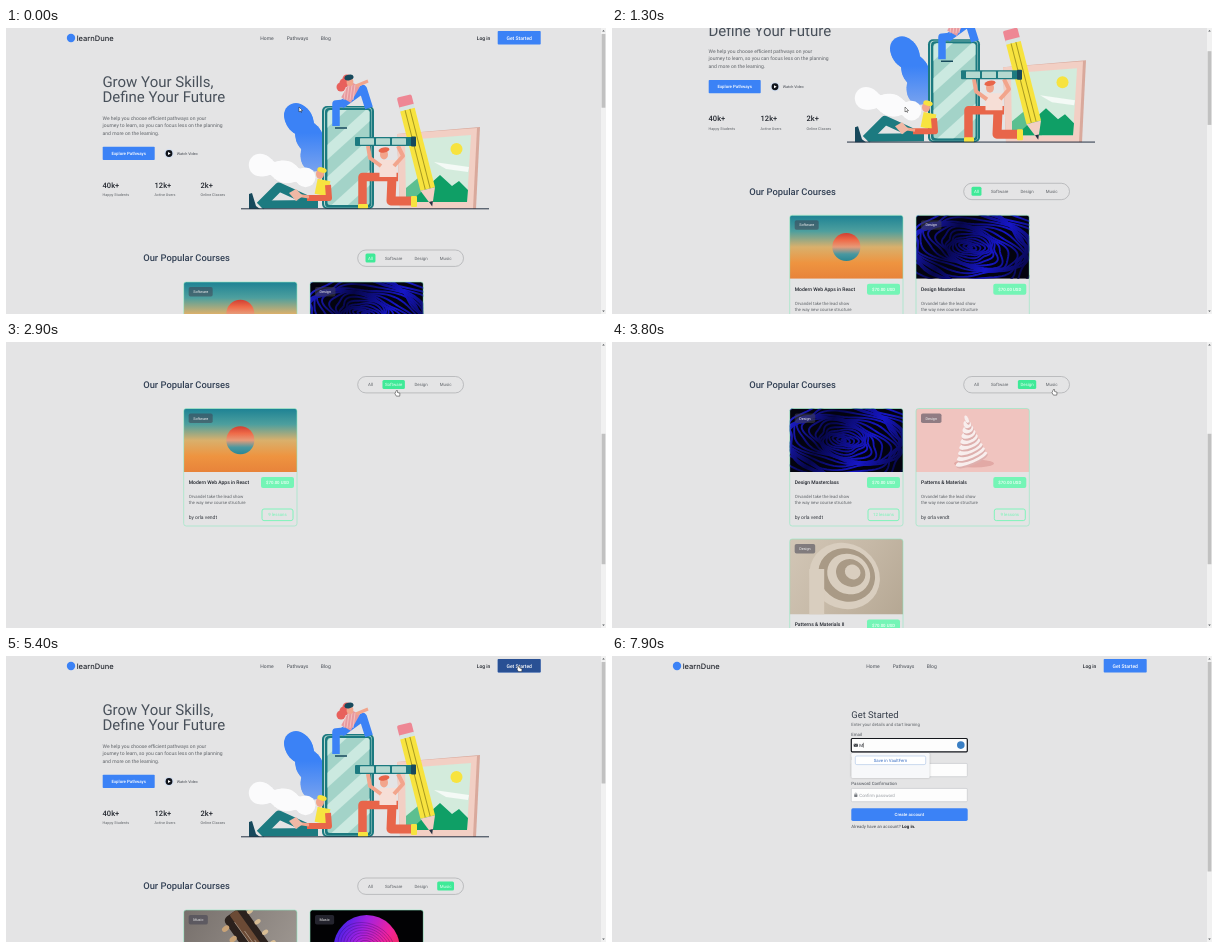
Animation, 600 px wide and 286 px high, one loop 8 s. Source, as an HTML page with a canvas:

```html
<!DOCTYPE html>
<html lang="en">
<head>
<meta charset="utf-8">
<title>Course site</title>
<style>
html, body { margin: 0; width: 100%; height: 100%; overflow: hidden; background: #e4e4e4; }
canvas { display: block; width: 600px; height: 286px; }
</style>
</head>
<body>
<canvas id="stage"></canvas>
<script>
const W = 600, H = 286, LOOP = 8000;
const BG = '#e4e4e5', BLUE = '#3b82f6', MINT = '#74f5b6', INK = '#263244', GREY = '#5f6368';
const TEAL = '#1c7a80', DEEP = '#17495c', RED = '#e8654a', SKIN = '#f2a58c', PINK = '#f2cfc4', YELLOW = '#f7e33f';
const REM = 5, SMALL = REM * 0.875, TINY = REM * 0.75;
const canvas = document.getElementById('stage');
const c = canvas.getContext('2d');
const dpr = window.devicePixelRatio || 1;
canvas.width = W * dpr;
canvas.height = H * dpr;

const ramp = (t, a, b) => Math.min(1, Math.max(0, (t - a) / (b - a)));
const ease = u => u * u * (3 - 2 * u);

function text(s, x, y, size, color, weight = 400, align = 'left', font = 'Roboto') {
  c.font = `${weight} ${size}px ${font}, sans-serif`;
  c.textAlign = align;
  c.fillStyle = color;
  c.fillText(s, x, y + size * 0.36);
}
function widthOf(s, size) {
  c.font = `400 ${size}px Roboto, sans-serif`;
  return c.measureText(s).width;
}
function paint(fill, stroke, lw = 0.6) {
  if (fill) { c.fillStyle = fill; c.fill(); }
  if (stroke) { c.strokeStyle = stroke; c.lineWidth = lw; c.stroke(); }
}
function box(x, y, w, h, r, fill, stroke, lw) {
  c.beginPath();
  c.roundRect(x, y, w, h, r);
  paint(fill, stroke, lw);
}
function disc(x, y, r, fill, ry = r, rot = 0) {
  c.beginPath();
  c.ellipse(x, y, r, ry, rot, 0, 7);
  paint(fill);
}
function line(p) {
  c.beginPath();
  for (let i = 0; i < p.length; i += 2) c.lineTo(p[i], p[i + 1]);
}
function poly(fill, ...p) {
  line(p);
  c.closePath();
  paint(fill);
}
function limb(color, lw, ...p) {
  line(p);
  c.lineJoin = 'round';
  paint(null, color, lw);
}
function grad(x0, y0, x1, y1, ...colors) {
  const g = c.createLinearGradient(x0, y0, x1, y1);
  colors.forEach((k, i) => g.addColorStop(i / (colors.length - 1), k));
  return g;
}
function fillAll(w, h, fill) {
  c.fillStyle = fill;
  c.fillRect(0, 0, w, h);
}
function scoped(fn) { c.save(); fn(); c.restore(); }
function faded(alpha, fn) {
  if (alpha > 0) scoped(() => { c.globalAlpha *= alpha; fn(); });
}

/* course pictures, 113 wide */
function sunset(w, h) {
  fillAll(w, h, grad(0, 0, 0, h, '#1d8294', '#4d9f9e', '#d9b06c', '#ee9440', '#e8833a'));
  const y = h / 2;
  disc(w / 2, y, 14, grad(0, y - 14, 0, y + 14, '#cf3f33', '#ef6a48', '#e79a78', '#4a98a0', '#2a8795'));
}
function waves(w, h) {
  fillAll(w, h, '#03030f');
  for (let r = 2; r < 95; r += 3.6) {
    c.beginPath();
    for (let a = 0; a < 6.3; a += 0.08) {
      const k = r * (1 + 0.16 * Math.sin(2 * a + r / 6) + 0.06 * Math.sin(5 * a - r / 4));
      c.lineTo(54 + k * Math.cos(a), h / 2 + k * 0.55 * Math.sin(a + 0.3));
    }
    c.closePath();
    paint(null, grad(0, 0, w, h, '#2020e0', '#06064a', '#1616c8', '#04042c'), 1.9);
  }
}
function guitar(w, h) {
  fillAll(w, h, grad(0, 0, w, h, '#77706c', '#a19a94'));
  scoped(() => {
    c.translate(44, 6);
    c.rotate(-0.62);
    box(-6, 0, 24, 90, 5, '#2b211d');
    box(2, 0, 9, 90, 2, '#6b4a35');
    for (let i = 0; i < 4; i++) {
      const y = 9 + i * 13;
      disc(-9, y, 4, '#c9a377', 2.6);
      disc(21, y, 3.4, '#d8bd94', 2.2);
      limb('#d7cabb', 0.5, 2 + i * 3, y, 2 + i * 3, 90);
    }
  });
}
function cream(w, h) {
  fillAll(w, h, '#f0c4bf');
  disc(58, 55, 20, '#e2a9a5', 4);
  for (let i = 0; i < 9; i++) {
    const y = 52 - i * 5, r = 17 - i * 1.9;
    disc(56 - i * 0.6, y, r, '#deb0ae', 4.6, -0.4);
    disc(55.5 - i * 0.6, y - 1.3, r, '#f8eeed', 3.9, -0.4);
  }
}
function swirl(w, h) {
  fillAll(w, h, grad(0, 0, w, h, '#d2c6b6', '#c6b9a7', '#b5a793'));
  for (let i = 0; i < 5; i++) {
    const r = 36 - i * 7;
    disc(55 + i * 2, 37 - i, r, i % 2 ? '#a99a86' : '#d9cebf', r * 0.9, 0.5);
  }
  limb('#d9cebf', 15, 27, 30, 27, h);
}
function orb(w, h) {
  fillAll(w, h, '#020204');
  disc(w / 2, 38, 33, grad(24, 20, 90, 55, '#3a22e8', '#a321e0', '#f0229c', '#f2303a'));
  for (let r = 3; r < 33; r += 3) {
    c.beginPath();
    c.ellipse(w / 2, 38, r, r * 0.8, 0.5, 0, 7);
    paint(null, 'rgba(20,0,60,.35)', 0.7);
  }
}
function cube(x, y, size, color) {
  scoped(() => {
    c.translate(x, y);
    c.rotate(-0.25);
    box(-size / 2, -size / 2, size, size, 0.5, color);
  });
}
function studio(w, h) {
  fillAll(w, h, '#050505');
  scoped(() => {
    c.transform(1, -0.22, 0.35, 1, 40, 73);
    box(0, 5, 52, 24, 1, '#141414');
    box(0, 0, 52, 24, 1, '#252525');
    for (let i = 0; i < 2; i++) {
      c.beginPath();
      c.ellipse(14 + i * 23, 12, 9, 5, 0, 0, 7);
      paint('#1a1a1a', '#666', 0.8);
    }
  });
  for (let i = 0; i < 2; i++) {
    box(17 + i * 44, 50, 24, 18, 2, '#1d1d1d');
    disc(29 + i * 44, 59, 6.5, '#303030');
    const x = 17 + i * 28;
    poly('#e4e4e4', x, 38, x + 10, 22, x + 22, 35);
    disc(x + 14, 28, 5, '#f6f6f6');
  }
  poly('#d0d0d0', 40, 67, 49, 45, 58, 65);
  cube(17, 74, 12, '#dedede');
  cube(88, 37, 8, '#cfcfcf');
  cube(28, 46, 7, '#888');
  disc(68, 23, 2, '#f4f4f4');
}

const course = (title, cat, h, art, n) => ({ title, cat, h, art, n, full: h + 47 + title.length * 7 });
const courses = [
  course(['Modern Web Apps in React'], 'Software', 63.5, sunset, 9),
  course(['Design Masterclass'], 'Design', 63.5, waves, 12),
  course(['Machine Learning Music', 'Production'], 'Music', 63.5, guitar, 8),
  course(['Patterns & Materials'], 'Design', 63.5, cream, 9),
  course(['Patterns & Materials II'], 'Design', 75.5, swirl, 10),
  course(['Melodic Soundbeds'], 'Music', 75.5, orb, 11),
  course(['Modern Sound Design'], 'Music', 113, studio, 15)
];

function card(k, x, y) {
  const w = 113.3;
  scoped(() => {
    c.translate(x, y);
    scoped(() => {
      c.beginPath();
      c.roundRect(0, 0, w, k.h, [2.5, 2.5, 0, 0]);
      c.clip();
      k.art(w, k.h);
    });
    box(0, 0, w, k.full, 2.5, null, '#8fe8bf');
    box(5, 5, widthOf(k.cat, TINY) + 9, 9.5, 1.8, 'rgba(66,66,82,.55)');
    text(k.cat, 9.5, 9.8, TINY, '#f3f3f3');
    c.translate(0, k.h);
    k.title.forEach((s, i) => text(s, 5, 10 + i * 7.5, REM, '#20242c', 500));
    box(77.3, 5, 33, 11, 2, MINT);
    text('$70.00 USD', 93.8, 10.5, SMALL, '#effff6', 500, 'center');
    c.translate(0, k.title.length * 7 - 7);
    text('Orvandel take the lead show', 5, 24.2, SMALL, GREY);
    text('the way new course structure', 5, 30.4, SMALL, GREY);
    text('by orla vendt', 5, 45, REM, '#33373e');
    box(78.3, 37, 31, 11.6, 2, null, MINT, 0.9);
    text(k.n + ' lessons', 93.8, 42.7, SMALL, MINT, 400, 'center');
  });
}
function grid(cat) {
  const list = courses.filter(k => cat === 'All' || k.cat === cat);
  let y = 254;
  for (let i = 0; i < list.length; i += 2) {
    const row = list.slice(i, i + 2);
    row.forEach((k, j) => card(k, 177.7 + j * 126.3, y));
    y += Math.max(...row.map(k => k.full)) + 13;
  }
}

/* hero picture */
function clouds() {
  const blue = grad(0, 105, 0, 148, BLUE, '#7fa6ee');
  for (let u = 0; u <= 1; u += 0.05) {
    disc(290 + 18 * Math.sin(u * 1.7), 87 + 46 * u, 12 + 1.5 * Math.sin(u * 16), blue);
  }
  for (let u = 0; u <= 1; u += 0.05) {
    disc(254 + 48 * u, 137 + 13 * u, 9 + 2.2 * Math.cos(u * 12), '#fbfbfc');
  }
}
function phone() {
  box(316, 78, 52, 103, 5, TEAL);
  box(318, 79.5, 48, 100, 4, '#b9d9d0');
  box(319, 80, 46.5, 99.5, 4, TEAL);
  scoped(() => {
    c.beginPath();
    c.roundRect(321.5, 82, 42, 95, 2.5);
    c.clip();
    c.fillStyle = '#a3d3c8';
    c.fillRect(321, 82, 43, 96);
    for (let y = 98; y < 220; y += 32) limb('#cbe9e0', 11, 315, y, 370, y - 50);
  });
  limb(DEEP, 1.5, 329, 100, 341, 100);
}
function frameArt() {
  poly('#d9a99c', 391, 106, 474, 99, 470, 181, 394, 181);
  poly(PINK, 391, 106, 471, 100, 467, 181, 394, 181);
  poly('#d3ebdc', 399, 112, 465, 107, 461, 174, 400, 174);
  poly('#f4faf6', 428, 134, 463, 139, 462, 144, 440, 141);
  disc(450.5, 121, 6, YELLOW);
  poly('#5cbf90', 400, 174, 400, 160, 412, 150, 430, 174);
  poly('#0f9f66', 404, 174, 434, 147, 446, 158, 453, 153, 462, 162, 461, 174);
}
function pencil() {
  scoped(() => {
    c.translate(398, 68);
    c.rotate(-0.25);
    box(-7.5, 0, 15, 12, 2, '#ee8794');
    box(-7.5, 10, 15, 4, 0, '#d7e4e2');
    box(-7.5, 14, 15, 82, 0, YELLOW);
    for (const x of [-3, 2]) box(x, 14, 1, 82, 0, '#a89a20');
    poly(PINK, -7.5, 96, 7.5, 96, 0, 114);
    poly(INK, -2, 109, 2, 109, 0, 114);
  });
}
function climber() {
  limb(BLUE, 7.5, 340, 75, 330, 76, 330, 98);
  limb(BLUE, 8, 335, 77, 357, 61, 363, 80);
  limb('#e79aa0', 11, 349, 56, 340, 72);
  for (let i = 0; i < 4; i++) limb('#f6c9c6', 0.8, 340 + i * 3, 57, 338 + i * 3, 72);
  limb(SKIN, 3, 350, 58, 362, 53);
  for (let i = 0; i < 3; i++) disc(335 + i * 3, 59 - i * 4, 4.5, '#e8605c');
  disc(344, 54, 3.4, SKIN, 4);
  disc(343, 49.5, 4.6, DEEP, 2.8, -0.2);
}
function reader() {
  limb(TEAL, 9, 306, 174, 273, 159, 254, 178);
  limb(TEAL, 8, 312, 176, 258, 176.5);
  poly(DEEP, 243, 166, 246, 165, 250, 178, 254, 181, 243, 181);
  limb(YELLOW, 13, 318, 152, 315, 167);
  limb(RED, 6, 322, 157, 323, 170, 301, 170);
  limb(SKIN, 3, 303, 169, 290, 167);
  poly('#f0b8a5', 283, 165, 290, 161, 297, 168, 290, 173);
  disc(314, 146, 4, SKIN, 5);
  disc(316, 142, 4.8, YELLOW, 2.6, 0.25);
}
function watcher() {
  limb(RED, 8.5, 392, 149, 356.5, 149, 356.5, 177);
  limb(RED, 9, 386, 149, 385, 173, 409, 173);
  box(352, 176, 10, 5, 1, YELLOW);
  box(405, 168, 6, 11, 1, YELLOW);
  limb('#f6ded6', 17, 382, 132, 382, 149);
  limb(SKIN, 4, 375, 138, 364, 130, 362, 118);
  limb(SKIN, 4, 388, 138, 397, 128, 392, 118);
  disc(378, 126.5, 4, SKIN, 5);
  disc(378, 122, 5.5, RED, 2.6, -0.2);
  box(349, 109, 61, 9, 1, TEAL);
  for (let i = 0; i < 3; i++) box(354 + i * 16, 110.2, 14, 6.6, 0.5, '#b5d9d0');
  box(405, 108.5, 5, 10, 1, DEEP);
}
function hero() {
  ['Grow Your Skills,', 'Define Your Future']
    .forEach((s, i) => text(s, 96.4, 53.9 + i * 15, REM * 3, '#48505a', 400));
  ['We help you choose efficient pathways on your',
    'journey to learn, so you can focus less on the planning',
    'and more on the learning.'].forEach((s, i) => text(s, 96.6, 89.7 + i * 7.5, REM, GREY));
  box(96.7, 118.8, 52, 13.3, 0.8, BLUE);
  text('Explore Pathways', 122.7, 125.5, SMALL, '#fff', 500, 'center');
  disc(163, 125.5, 4.6, '#cfdcf0');
  disc(163, 125.5, 3.4, '#10131a');
  poly('#fff', 162, 124, 164.7, 125.5, 162, 127);
  text('Watch Video', 170.7, 125.5, TINY, '#41464e');
  [['40k+', 'Happy Students'], ['12k+', 'Active Users'], ['2k+', 'Online Classes']].forEach(([n, s], i) => {
    const x = 96.6 + i * 52 - (i > 1 ? 6 : 0);
    text(n, x, 156.9, REM * 1.5, '#22262e', 500);
    text(s, x, 167, TINY, GREY);
  });
  [clouds, phone, climber, frameArt, pencil, watcher, reader].forEach(f => f());
  limb(INK, 1, 235, 180.8, 483, 180.8);
}

function header(hover) {
  disc(65, 10, 4.2, BLUE);
  text('learnDune', 70.7, 9.8, 7.5, '#20242c', 500, 'left', 'Inter');
  text('Home', 254.3, 9.8, REM, '#4a4f57');
  text('Pathways', 280.7, 9.8, REM, '#4a4f57');
  text('Blog', 314.7, 9.8, REM, '#4a4f57');
  text('Log in', 470.7, 9.8, REM, '#22262e', 500);
  box(491.7, 3, 43, 13.5, 0.8, BLUE);
  faded(hover, () => box(491.7, 3, 43, 13.5, 0.8, '#182338'));
  text('Get Started', 513.2, 9.8, REM, '#fff', 500, 'center');
}

const steps = [[0, 'All'], [2300, 'Software'], [3200, 'Design'], [3900, 'Music']];
function catalogue(t) {
  const i = steps.findLastIndex(s => t >= s[0]);
  const [from, cat] = steps[i];
  text('Our Popular Courses', 137.2, 230, REM * 1.875, '#334155', 500);
  box(351.7, 222, 105.8, 16.4, 8.2, null, '#a9abae', 0.7);
  let x = 362;
  for (const [, s] of steps) {
    const w = widthOf(s, SMALL), on = s === cat;
    if (on) box(x - 2.5, 225.6, w + 5, 9, 1.5, '#3fea98');
    text(s, x, 230, SMALL, on ? '#e6fff2' : GREY);
    x += w + 12;
  }
  const u = i ? ease(ramp(t, from, from + 300)) : 1;
  if (u < 1) faded(1 - u, () => grid(steps[i - 1][1]));
  faded(u, () => grid(cat));
}

function home(t, scroll, hover) {
  scoped(() => {
    c.translate(0, -scroll);
    header(hover);
    hero();
    catalogue(t);
    if (t >= 3900) limb('#d2d2d5', 0.6, 0, 580, 595, 580);
  });
}

function icon(y, mail, color) {
  if (mail) {
    box(241.7, y - 1.4, 4.2, 3, 0.4, color);
    limb('#fff', 0.4, 241.9, y - 1, 243.8, y + 0.4, 245.7, y - 1);
  } else {
    box(242.2, y - 0.6, 3.2, 2.6, 0.4, color);
    box(242.8, y - 1.9, 2, 2, 0.8, null, color, 0.5);
  }
}
function field(label, hint, y, mail) {
  text(label, 239.3, y - 4.5, SMALL, '#4a4f57');
  box(239.3, y, 116, 13.3, 1, '#fdfdfd', '#bfc2c6');
  icon(y + 6.6, mail, '#777b81');
  text(hint, 247.3, y + 6.7, SMALL, '#9a9ea4');
}
function form(t) {
  text('Get Started', 239.3, 58.2, REM * 1.875, '#333b47');
  text('Enter your details and start learning', 239.3, 68, SMALL, GREY);
  field('Email', 'Email', 82.5, true);
  field('Password', 'Password', 107.4);
  field('Password Confirmation', 'Confirm password', 132.4);
  box(239.3, 152.3, 116.4, 12.6, 1.6, BLUE);
  text('Create account', 297.4, 158.5, SMALL, '#fff', 500, 'center');
  text('Already have an account?', 239.3, 170.2, SMALL, '#4a4f57');
  text('Log in.', 290, 170.2, SMALL, '#16191f', 700);
  if (t >= 6600) focused(t);
}
function focused(t) {
  const typed = t >= 7600 ? 'M' : '';
  box(239.3, 82.5, 116, 13.3, 1, '#fdfdfd', '#14171c', 1.2);
  icon(89.1, true, '#30343a');
  text(typed || 'Email', 247.3, 89.2, SMALL, typed ? '#22262e' : '#9a9ea4');
  const caret = 247.3 + widthOf(typed, SMALL) + 0.3;
  if (typed || t % 1000 < 500) limb('#111', 0.5, caret, 86.8, caret, 91.6);
  disc(348.8, 89.1, 3.8, '#3a7fc4');
  faded(ramp(t, 6900, 7200), () => {
    scoped(() => {
      c.shadowColor = 'rgba(0,0,0,.25)';
      c.shadowBlur = 2 * dpr;
      box(239.3, 97, 78.4, 25, 1.2, '#f7f8fa');
    });
    box(243.3, 100, 70.4, 8.6, 1.5, '#fff', '#a9c3e6');
    text('Save in VaultFern', 278.5, 104.3, SMALL, '#3a6fc4', 400, 'center');
  });
}

function scrollbar(scroll, page) {
  box(595, 0, 5, H, 0, '#f1f1f1');
  box(595.6, 6 + 274 * scroll / page, 3.8, 274 * H / page, 0, '#c1c1c1');
  poly('#55585c', 596.2, 3.6, 597.5, 2, 598.8, 3.6);
  poly('#55585c', 596.2, 282.4, 597.5, 284, 598.8, 282.4);
}
function pageHeight(t) {
  if (t >= 5700) return 374;
  if (t >= 4400) return 645;
  return t >= 2300 ? 600 : 1063;
}
function scrollAt(t) {
  const down = 187.5 * ramp(t, 970, 1900) + 125 * ramp(t, 4400, 4840);
  return down * (1 - ramp(t, 4900, 5400) ** 2);
}

// arrival time and place; each move takes MOVE ms
const MOVE = 400;
const stops = [[0, 293, 79], [1900, 386, 49], [3200, 417, 46], [3800, 442, 47.5],
  [4700, 470, 95], [5400, 513, 10], [6300, 474, 26], [6600, 300, 88]];
function pointerAt(t) {
  return stops.reduce(([x, y], [at, nx, ny]) => {
    const u = ease(ramp(t, at - MOVE, at));
    return [x + (nx - x) * u, y + (ny - y) * u];
  }, [293, 79]);
}
function pointer(x, y, hand) {
  scoped(() => {
    c.translate(x, y);
    c.lineJoin = 'round';
    if (hand) {
      poly('#fff', -0.6, 0, 0.5, 0, 0.6, 2, 3, 2.7, 2.8, 5.6, -0.6, 5.6, -2, 3.2);
    } else {
      poly('#fff', 0, 0, 0, 5, 1.2, 4, 2.4, 5.5, 2, 3.7, 3.6, 3.6);
    }
    paint(null, '#222', 0.5);
  });
}

function draw(t) {
  c.setTransform(dpr, 0, 0, dpr, 0, 0);
  c.textRendering = 'geometricPrecision';
  fillAll(W, H, BG);
  const scroll = scrollAt(t);
  const hover = ramp(t, 5350, 5450) - ramp(t, 6300, 6600);
  if (t < 5700) {
    home(t, scroll, hover);
  } else {
    header(hover);
    faded(ramp(t, 5700, 5900), () => form(t));
  }
  scrollbar(scroll, pageHeight(t));
  if (t < 6700) pointer(...pointerAt(t), (t > 1900 && t < 4400) || (t > 5350 && t < 6400));
}

const start = performance.now();
function tick() {
  draw((performance.now() - start) % LOOP);
  requestAnimationFrame(tick);
}
tick();
</script>
</body>
</html>
```
